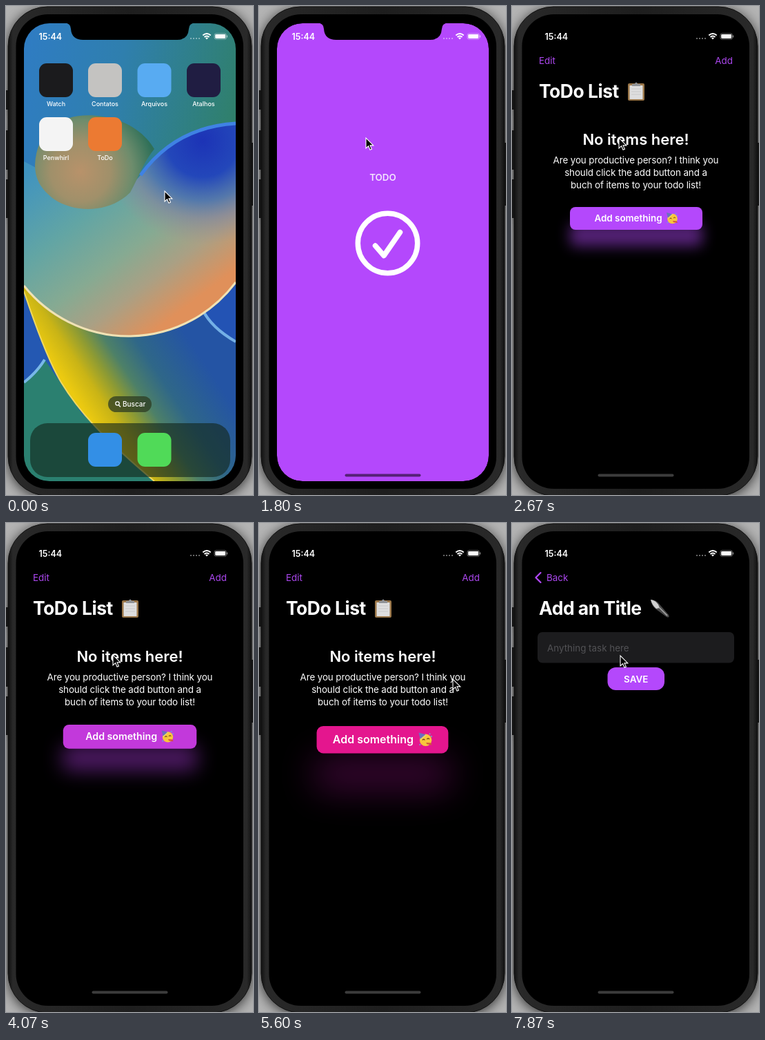
Recreate the animation shown at these times as an HTML page. Size 358 px wide and 708 px high, loop 8 s.

```html
<!DOCTYPE html>
<html lang="pt">
<head>
<meta charset="utf-8">
<title>ToDo</title>
<style>
html, body { margin: 0; width: 100%; height: 100%; overflow: hidden; background: #b4b4b4; }
body { font: 400 13.4px Inter, "Open Sans", sans-serif; }
#stage { position: absolute; left: 0; top: 0; width: 358px; height: 708px; overflow: hidden; --accent: #b448fc; }
#stage > svg, .page, .page > svg { position: absolute; left: 0; top: 0; width: 100%; height: 100%; }
#screen { position: absolute; left: 26px; top: 25px; width: 307px; height: 663px; border-radius: 37px; overflow: hidden; background: #000; }
#body { filter: drop-shadow(0 3px 9px #000b); }
#icons rect { width: 49px; height: 49px; rx: 11px; }
text { fill: #fff; }
.mid { text-anchor: middle; }
.bold { font-weight: 600; }
.large { font-size: 26.5px; font-weight: 700; letter-spacing: -.5px; }
.copy { letter-spacing: -.1px; fill: #ececec; }
.link { fill: #ab47ee; }
.labels { font-size: 9px; font-weight: 500; }

.move { animation: 8s linear infinite; }
#cursor { animation-name: cursor; animation-timing-function: ease-in-out; }
#todoIcon { animation-name: tap; }
#home { animation-name: zoomHome; }
#splash { background: var(--accent); animation-name: launch; }
#list { animation-name: appear; }
#listBody { background: #000; animation-name: leave; }
#addPage { background: #000; animation-name: enter; }
#rootNav { animation-name: rootNav; }
#backNav { animation-name: backNav; }
#addLink { animation-name: press; }
#homeBar { animation-name: homeBar; }
#cta {
  position: absolute; left: 0; right: 0; top: 266px; margin: auto; height: 32.5px;
  display: flex; align-items: center; justify-content: center; gap: 5px;
  border-radius: 8px; color: #fff; font-weight: 600; white-space: nowrap;
  animation-name: pulse; animation-timing-function: ease-in-out;
}
#cta svg { width: 18px; height: 18px; flex: none; }

@keyframes cursor {
  0%, 8.375% { transform: translate(230px, 268px); }
  13.5%, 63.75% { transform: translate(155px, 191px); }
  70%, 71.9% { transform: translate(281px, 226px); }
  80.6%, 95% { transform: translate(306px, 82px); }
  98.3%, 100% { transform: translate(157px, 192px); }
}
@keyframes tap {
  0%, 13.6% { filter: none; }
  13.7%, 100% { filter: brightness(.6); }
}
@keyframes zoomHome {
  0%, 14.375% { transform: none; opacity: 1; animation-timing-function: ease-out; }
  20.6% { transform: scale(1.12); opacity: 1; }
  20.7%, 100% { transform: scale(1.12); opacity: 0; }
}
@keyframes launch {
  0%, 14.375% { left: 93px; top: 136px; width: 49px; height: 49px; border-radius: 11px; opacity: 0; animation-timing-function: cubic-bezier(.25, .8, .3, 1); }
  15.6% { opacity: 1; }
  20.6%, 27% { left: 0; top: 0; width: 307px; height: 663px; border-radius: 37px; opacity: 1; }
  27.1%, 100% { left: 0; top: 0; width: 307px; height: 663px; border-radius: 37px; opacity: 0; }
}
@keyframes appear {
  0%, 23.25% { opacity: 0; }
  26.9%, 100% { opacity: 1; }
}
@keyframes leave {
  0%, 85.4% { transform: none; animation-timing-function: cubic-bezier(.25, .75, .25, 1); }
  92.5%, 100% { transform: translateX(-30%); }
}
@keyframes enter {
  0%, 85.4% { transform: translateX(100%); animation-timing-function: cubic-bezier(.25, .75, .25, 1); }
  92.5%, 100% { transform: none; }
}
@keyframes rootNav {
  0%, 23.25% { opacity: 0; }
  26.9%, 85.4% { opacity: 1; }
  89%, 100% { opacity: 0; }
}
@keyframes backNav {
  0%, 86% { opacity: 0; }
  90.5%, 100% { opacity: 1; }
}
@keyframes press {
  0%, 82.6% { opacity: 1; }
  83.2%, 100% { opacity: .3; }
}
@keyframes homeBar {
  0%, 18% { fill: #0000; }
  20%, 23.25% { fill: #0008; }
  26.9%, 100% { fill: #3c3c3c; }
}
@keyframes pulse {
  0%, 41.625%, 91.625%, 100% {
    width: 192px; transform: none; background: #b448fc;
    box-shadow: 0 24px 19px #b448fc78;
  }
  66.625% {
    width: 159px; transform: translateY(6.4px) scale(1.2); background: #e6148a;
    box-shadow: 0 42px 44px 3px #c014a450;
  }
}
</style>
</head>
<body>
<div id="stage">
  <svg viewBox="0 0 358 708">
    <defs>
      <linearGradient id="edge"><stop stop-color="#111"/><stop offset=".02" stop-color="#292929"/><stop offset=".5" stop-color="#1e1e1e"/><stop offset=".98" stop-color="#292929"/><stop offset="1" stop-color="#111"/></linearGradient>
    </defs>
    <g id="body">
      <path d="M0 122h5v28H0zM0 180h5v57H0zM0 251h5v56H0zM353 198h5v91h-5z" fill="#161616"/>
      <rect x="3" y="1" width="353" height="708" rx="57" fill="url(#edge)" stroke="#111"/>
    </g>
    <rect x="14.500" y="12" width="329.500" height="687" rx="46"/>
  </svg>

  <div id="screen">
    <div id="home" class="page move">
      <svg viewBox="26 25 307 663">
        <defs>
          <linearGradient id="sky" y2=".35"><stop stop-color="#2f7cc4"/><stop offset=".45" stop-color="#2f7fae"/><stop offset="1" stop-color="#30806a"/></linearGradient>
          <linearGradient id="ground" gradientUnits="userSpaceOnUse" x1="70" y1="560" x2="250" y2="440"><stop offset=".1" stop-color="#ecca10"/><stop offset=".24" stop-color="#c9b416"/><stop offset=".36" stop-color="#8c9a34"/><stop offset=".48" stop-color="#4d8068"/><stop offset=".65" stop-color="#2f6788"/><stop offset=".95" stop-color="#2454a4"/></linearGradient>
          <linearGradient id="sphere" x2=".75" y2="1"><stop offset=".15" stop-color="#3f93c0"/><stop offset=".42" stop-color="#62a5a4"/><stop offset=".62" stop-color="#86aa92"/><stop offset=".76" stop-color="#aaa084"/><stop offset=".92" stop-color="#e0905a"/></linearGradient>
          <radialGradient id="glow" gradientUnits="userSpaceOnUse" cx="285" cy="195" r="150"><stop stop-color="#1c33b6"/><stop offset=".35" stop-color="#2347ba"/><stop offset=".58" stop-color="#4a70b0" stop-opacity=".85"/><stop offset=".75" stop-color="#8080a0" stop-opacity=".6"/><stop offset="1" stop-color="#a08a90" stop-opacity="0"/></radialGradient>
          <radialGradient id="swirl" gradientUnits="userSpaceOnUse" cx="108" cy="240" r="108"><stop stop-color="#b8926a"/><stop offset=".4" stop-color="#a0906a"/><stop offset=".7" stop-color="#6d8c6c"/><stop offset="1" stop-color="#2f7058"/></radialGradient>
          <path id="ball" d="M26 405A194 194 0 0 0 333 400V170C270 174 225 203 195 245C150 300 80 300 45 235L26 225Z"/>
        </defs>
        <rect x="26" y="25" width="307" height="400" fill="url(#sky)"/>
        <rect x="26" y="380" width="307" height="308" fill="#2458b2"/>
        <path d="M26 545Q45 530 56 512L110 590L215 688H26Z" fill="#2b8070"/>
        <path d="M26 545Q45 530 56 512" fill="none" stroke="#78b8e8" stroke-width="4"/>
        <path d="M26 413C45 470 62 515 80 545C105 586 140 625 215 688H333V380H26Z" fill="url(#ground)"/>
        <path d="M26 413C45 470 62 515 80 545C105 586 140 625 215 688" fill="none" stroke="#f0d860" stroke-width="2"/>
        <path d="M285 440Q298 466 333 486V400Z" fill="#2353b4"/>
        <path d="M285 440Q298 466 333 486" fill="none" stroke="#74b0e6" stroke-width="4"/>
        <use href="#ball" fill="url(#sphere)"/>
        <use href="#ball" fill="url(#glow)"/>
        <path d="M195 245C225 203 270 174 333 170" fill="none" stroke="#3f82e4" stroke-width="5"/>
        <path d="M26 405A194 194 0 0 0 333 400" fill="none" stroke="#f0e2b4" stroke-width="3"/>
        <path d="M42 230C45 172 90 152 140 160C180 166 204 188 215 207C200 225 192 248 180 270C150 300 100 300 70 280C50 265 42 250 42 230Z" fill="url(#swirl)"/>
        <rect x="35" y="604" width="290" height="78" rx="25" fill="#12261c" opacity=".62"/>
        <rect x="148" y="565" width="63" height="23" rx="11.500" fill="#2c3b22" opacity=".75"/>
        <g id="icons">
          <rect x="48" y="83" fill="#1b1b1d"/><rect x="119" y="83" fill="#c4c3c1"/>
          <rect x="190.500" y="83" fill="#58abf2"/><rect x="262" y="83" fill="#201d42"/>
          <rect x="48" y="161" fill="#f4f4f4"/><rect id="todoIcon" class="move" x="119" y="161" fill="#ec7a32"/>
          <rect x="119" y="618" fill="#338fe6"/><rect x="190.500" y="618" fill="#50da58"/>
        </g>
        <g class="labels mid">
          <text x="72.500" y="145">Watch</text><text x="143.500" y="145">Contatos</text>
          <text x="215" y="145">Arquivos</text><text x="286.500" y="145">Atalhos</text>
          <text x="72.500" y="223">Penwhirl</text><text x="143.500" y="223">ToDo</text>
        </g>
        <text x="169" y="580" font-size="10" font-weight="500">Buscar</text>
        <path d="M163.500 578l2.500 2.500" stroke="#fff" stroke-width="1.300"/><circle cx="161.500" cy="575.500" r="2.700" fill="none" stroke="#fff" stroke-width="1.200"/>
      </svg>
    </div>

    <svg id="splash" class="move" style="position:absolute" viewBox="26 25 307 663" preserveAspectRatio="xMidYMid slice">
      <text class="mid bold" x="179.500" y="252.500" opacity=".85">TODO</text>
      <g fill="none" stroke="#fff" stroke-width="7.500" stroke-linecap="round" stroke-linejoin="round">
        <circle cx="186.500" cy="343.500" r="43.200"/>
        <path d="M168.500 347L181 361.500L204.500 327.500"/>
      </g>
    </svg>

    <div id="list" class="page move">
      <div id="listBody" class="page move">
        <svg viewBox="26 25 307 663">
          <text class="large" x="39" y="133">ToDo List</text>
          <g transform="translate(168 110)">
            <rect y="2" width="24" height="25" rx="2" fill="#9a7648"/>
            <path d="M2.500 5h19v20h-19z" fill="#dedede"/>
            <path d="M5 10h14M5 14h14M5 18h14" stroke="#c9c9c9"/>
            <path d="M6 6V3h3.500q2.500-5 5 0H18v3z" fill="#8f9296"/>
          </g>
          <text class="mid" x="179.500" y="201" font-size="22" font-weight="600">No items here!</text>
          <g class="mid copy">
            <text x="179.500" y="228">Are you productive person? I think you</text>
            <text x="179.500" y="246">should click the add button and a</text>
            <text x="179.500" y="264">buch of items to your todo list!</text>
          </g>
        </svg>
        <div id="cta" class="move">
          <span>Add something</span>
          <svg viewBox="0 0 18 18">
            <circle cx="9.500" cy="10" r="7.300" fill="#f8c63c"/>
            <path d="M1 1L10 3.500L3 9.500Z" fill="#6a6fc0"/>
            <path d="M3 9.500L10 3.500" stroke="#e8d46a" stroke-width="1.500"/>
            <path d="M5.500 10q1.500-2 3 0M11 9q1.500-2 3 0" fill="none" stroke="#6a3f16"/>
            <path d="M10 13l6 .5 1 2.500-6-1z" fill="#d3543c"/>
            <path d="M14 2l1 1M16 6l1-1M2 15l1 1" stroke="#58b8e0" stroke-width="1.500"/>
          </svg>
        </div>
      </div>
    </div>

    <div id="addPage" class="page move">
      <svg viewBox="26 25 307 663">
        <text class="large" x="39" y="133">Add an Title</text>
        <g transform="translate(201 111)">
          <path d="M0 0Q8 0 13 7L26 22Q28 27 23 25L8 14Q1 9 0 0Z" fill="#4a4a4a"/>
          <path d="M0 0Q7 1 11 7L13 12L8 13Q2 8 0 0Z" fill="#d0d0d0"/>
          <path d="M12 11L24 23" stroke="#aaa" stroke-width="1.500"/>
        </g>
        <rect x="37" y="158" width="285" height="44.500" rx="7" fill="#1c1c1e"/>
        <text x="51" y="185.500" style="fill:#525255">Anything task here</text>
        <rect x="138.500" y="209" width="82.500" height="33" rx="12" fill="#b448fc"/>
        <text class="mid bold" x="179.700" y="230.500">SAVE</text>
      </svg>
    </div>

    <div class="page">
      <svg viewBox="26 25 307 663">
        <g id="rootNav" class="move">
          <text class="link" x="39" y="84">Edit</text>
          <text id="addLink" class="link move" x="320" y="84" text-anchor="end">Add</text>
        </g>
        <g id="backNav" class="move">
          <path d="M41.500 72L34.500 79L41.500 86" fill="none" stroke="#b448fc" stroke-width="2.200" stroke-linecap="round" stroke-linejoin="round"/>
          <text class="link" x="50" y="84">Back</text>
        </g>
      </svg>
    </div>
  </div>

  <svg viewBox="0 0 358 708">
    <path d="M84 24Q94 25 94 33Q95 49 112 49H248Q264 49 265 33Q265 25 275 24Z"/>
    <text class="bold" x="47.500" y="48.500" font-size="12.500">15:44</text>
    <path d="M267 47h14" stroke="#fff" stroke-opacity=".4" stroke-width="1.800" stroke-dasharray="2 2"/>
    <path d="M285.300 42.500Q291 37.500 296.700 42.500M287.500 45Q291 41.800 294.500 45" fill="none" stroke="#fff" stroke-width="1.900"/>
    <path d="M289 46.300Q291 44.700 293 46.300L291 48.500Z" fill="#fff"/>
    <rect x="302" y="39.800" width="17.500" height="8.400" rx="2.500" fill="none" stroke="#fff" stroke-opacity=".5" stroke-width=".8"/>
    <rect x="303.200" y="41" width="15" height="6" rx="1.400" fill="#fff"/>
    <path d="M320.600 42.500v3" stroke="#fff" stroke-opacity=".6"/>
    <rect id="homeBar" class="move" x="124.500" y="677.500" width="110" height="4" rx="2"/>
    <g id="cursor" class="move">
      <path d="M0 0V15L3.600 11.700L6 17.200L8.400 16.200L6 10.900H10.800Z" stroke="#fff" stroke-width="1.100"/>
    </g>
  </svg>
</div>
</body>
</html>
```
